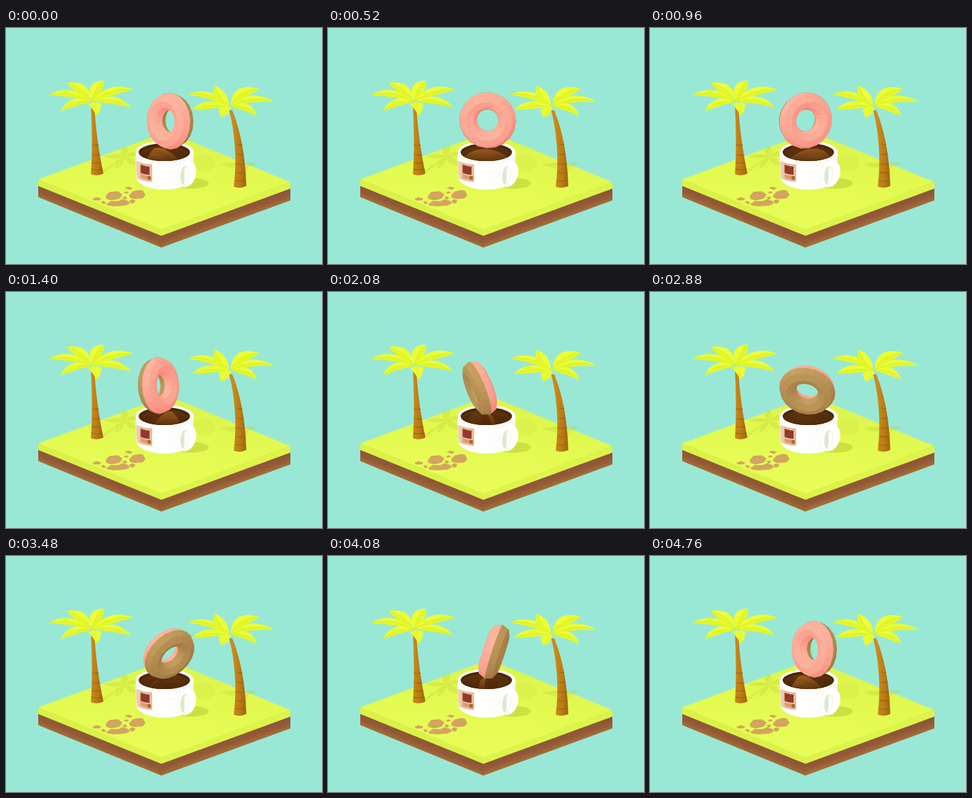
An HTML page with a canvas that plays this animation: 480 px wide and 360 px high, repeating every 4.8 s.

```html
<!DOCTYPE html>
<html>
<head>
<meta charset="utf-8">
<title>Donut and coffee island</title>
<style>
html, body { margin: 0; width: 100%; height: 100%; overflow: hidden; background: #99e8d6; }
canvas { display: block; }
</style>
</head>
<body>
<canvas id="stage" width="480" height="360"></canvas>
<script>
const ctx = document.getElementById('stage').getContext('2d');
const LOOP = 4800, TAU = Math.PI * 2, RAD = Math.PI / 180;

function gradient(x0, y0, x1, y1, ...colors) {
  const g = ctx.createLinearGradient(x0, y0, x1, y1);
  colors.forEach((c, i) => g.addColorStop(i / (colors.length - 1), c));
  return g;
}
function shape(path, color) {
  ctx.fillStyle = color;
  ctx.fill(new Path2D(path));
}
function line(path, color, width) {
  ctx.strokeStyle = color;
  ctx.lineWidth = width;
  ctx.stroke(new Path2D(path));
}
function ellipse(x, y, rx, ry, color) {
  ctx.beginPath();
  ctx.ellipse(x, y, rx, ry, 0, 0, TAU);
  ctx.fillStyle = color;
  ctx.fill();
}

function ground() {
  shape('M49 231L236 306V335L49 258Z', gradient(49, 240, 42.6, 255.4, '#8e5539', '#935a36', '#a66f38'));
  shape('M432 235L236 306V335L432 263Z', gradient(432, 245, 437.8, 261, '#8e5539', '#935a36', '#a66f38'));
  shape('M49 231L236 306V317L49 241Z', '#daf247');
  shape('M432 235L236 306V317L432 245Z', '#dcf44a');
  shape('M49 231L245 158L432 235L236 307Z', gradient(240, 158, 225, 306, '#dcf44e', '#e3fa50', '#e9fd5a'));
  const shade = 'rgba(178,200,48,.25)';
  ellipse(300, 206, 17, 13, 'rgba(178,200,48,.12)');
  ellipse(281, 237, 27, 8, 'rgba(178,190,48,.45)');
  shape('M140 222L176 197Q158 202 149 195Q164 191 177 194Q170 184 182 180Q188 186 182 194Q196 184 208 190Q196 197 184 196Q199 201 197 210Q183 208 180 198Q178 211 166 214Q165 204 177 198L148 222Z', shade);
  shape('M352 241L364 211Q345 217 325 208Q344 203 364 208Q372 201 382 206Q376 211 367 212L360 242Z', shade);
}

function stones() {
  shape(`M131 261L137 258L145 260L142 263L134 263Z
    M144 265L149 264L152 267L148 269Z
    M151 257L157 250L170 249L177 254L173 260L161 263L153 261Z
    M152 269L159 264L171 264L177 261L186 264L188 268L181 271L165 272L155 271Z
    M180 244L186 242L193 244L188 247Z
    M179 251L183 249L187 251L182 253Z
    M187 255L193 249L203 247L208 248L212 255L207 260L195 261L188 259Z
    M177 258L182 257L184 260L180 262Z
    M187 264L192 261L197 264L193 268L189 267Z`, '#d3a560');
}

// Curved leaf from the crown to its tip, with a slightly darker lower half and rib.
function leaf(x, y, cx, cy, tx, ty, w) {
  const len = Math.hypot(tx - x, ty - y);
  let nx = -(ty - y) / len * w, ny = (tx - x) / len * w;
  if (ny < 0) { nx = -nx; ny = -ny; }
  const start = `M${x} ${y}Q`, back = `${tx} ${ty}Q`;
  const up = `${cx - nx} ${cy - ny} `, low = `${cx + nx} ${cy + ny} `;
  shape(`${start}${up}${back}${low}${x} ${y}`, '#ecfe35');
  shape(`${start}${cx} ${cy} ${back}${low}${x} ${y}`, '#e2f62a');
  line(`${start}${cx} ${cy} ${tx} ${ty}`, '#cfe42a', .6);
}

const BARK = ['#c98b1e', '#bd7c14', '#a0640f'];

function leftPalm() {
  shape('M129 119L134 119Q138 177 148 222Q138 227 129 223Q132 178 129 119Z', gradient(128, 0, 148, 0, ...BARK));
  line('M131 178Q136 181 141 178M131 193Q137 196 143 193M130 205Q138 208 145 205M130 215Q138 218 147 215', '#8f5d14', .9);
  leaf(130, 113, 96, 92, 64, 103, 10);
  leaf(129, 111, 119, 90, 91, 84, 15);
  leaf(131, 112, 134, 90, 149, 80, 18);
  leaf(133, 111, 157, 91, 194, 94, 12);
  leaf(133, 112, 164, 104, 190, 121, 11);
  leaf(129, 113, 101, 108, 83, 127, 11);
  shape('M125 116L133 113L145 115L143 126L138 134L133 126Z', '#eafc32');
  line('M134 114L138 133', '#cfe42a', .6);
}

function rightPalm() {
  shape('M339 125L344 126Q363 174 365 241Q355 246 346 242Q353 182 339 125Z', gradient(345, 0, 365, 0, ...BARK));
  line('M351 177Q355 180 359 177M351 192Q356 195 361 192M350 207Q356 210 363 207M349 220Q356 223 363 220M348 232Q356 236 364 232', '#8f5d14', .9);
  leaf(339, 120, 308, 95, 277, 102, 10);
  leaf(339, 119, 323, 106, 317, 88, 18);
  leaf(341, 118, 352, 95, 385, 93, 16);
  leaf(342, 119, 372, 101, 409, 113, 10);
  leaf(342, 120, 366, 115, 382, 134, 11);
  leaf(338, 120, 306, 113, 282, 125, 11);
  shape('M323 123L337 119L341 122L337 131L328 137L324 130Z', '#eafc32');
  line('M338 121L329 136', '#cfe42a', .6);
}

function mugBody() {
  shape('M197 190L198 229C201 240 220 246.5 240 246.5C261 246.5 279 241 284 229L285 190Z', gradient(197, 0, 285, 0, '#f8faf6', '#ffffff', '#fdfdfc', '#f4f6ef'));
  shape('M198 203Q210 208 222 208V235Q208 234 199 229Z', '#e8bc94');
  shape('M198 203L203 205V231L199 229Z', '#efcbaf');
  shape('M204.5 208.5Q211 211 218 211.5V224Q211 224 204.5 221Z', '#93382e');
  shape('M205 223Q210 226 215 226V231Q209 230 205 228Z', '#d99a70');
  shape('M215 226L220 226V232L215 231Z', '#b4622b');
  // Handle
  shape('M263 220C264 208 270 203 276 202C286 203 290 211 289 220C288 234 279 243 270 243C264 241 262 234 263 220Z', '#ffffff');
  shape('M265 230C264 218 268 211 273 210C269 222 273 230 270 239C266 239 265 235 265 230Z', '#dfe7cd');
  line('M273 210C280 216 280 231 269 242', '#f1f4e6', 1.2);
}

// Ring leaning on its lowest point while it turns about the vertical axis.
const RING = 30, TUBE = 13, THICK = 14.5, SEGMENTS = 20, SIDES = 8;
const LEAN = 15 * RAD, VIEW = 24 * RAD, START = -47 * RAD;
const LIGHT = [-.35, .85, .4];
// Each material runs from its shaded to its lit colour.
const GLAZE = [[247, 116, 108], [252, 182, 160]];
const DOUGH = [[146, 108, 56], [198, 160, 96]];
const GLAZE_MIRROR = [[140, 82, 24], [186, 120, 48]];
const DOUGH_MIRROR = [[88, 48, 14], [122, 74, 26]];

function donutFaces(turn, mirrored) {
  const sl = Math.sin(LEAN), cl = Math.cos(LEAN), st = Math.sin(turn), ct = Math.cos(turn);
  const right = [ct, 0, -st], up = [-sl * st, cl, -sl * ct], normal = [cl * st, sl, cl * ct];
  const mix = (a, b, c) => right.map((r, i) => r * a + up[i] * b + normal[i] * c);
  const point = (u, v) => {
    const r = RING + TUBE * Math.cos(v);
    const p = mix(r * Math.cos(u), r * Math.sin(u) + RING + TUBE, THICK * Math.sin(v));
    if (mirrored) p[1] = -2 - p[1];
    return {
      x: 241 + p[0],
      y: 183 - p[1] * Math.cos(VIEW) + p[2] * Math.sin(VIEW),
      depth: p[2] * Math.cos(VIEW) + p[1] * Math.sin(VIEW)
    };
  };
  const glaze = mirrored ? GLAZE_MIRROR : GLAZE, dough = mirrored ? DOUGH_MIRROR : DOUGH;
  const du = TAU / SEGMENTS, dv = TAU / SIDES, faces = [];
  for (let i = 0; i < SEGMENTS; i++) for (let j = 0; j < SIDES; j++) {
    const u = i * du, v = j * dv, mu = u + du / 2, mv = v + dv / 2;
    const n = mix(Math.cos(mv) * Math.cos(mu), Math.cos(mv) * Math.sin(mu), Math.sin(mv));
    const lit = .5 + .5 * (n[0] * LIGHT[0] + n[1] * LIGHT[1] + n[2] * LIGHT[2]);
    const [dark, bright] = Math.sin(mv) > 0 ? glaze : dough;
    const points = [point(u, v), point(u + du, v), point(u + du, v + dv), point(u, v + dv)];
    faces.push({
      points,
      depth: points.reduce((sum, p) => sum + p.depth, 0),
      color: `rgb(${dark.map((c, k) => Math.round(c + (bright[k] - c) * lit))})`
    });
  }
  return faces.sort((a, b) => a.depth - b.depth);
}

function donut(turn, mirrored) {
  ctx.lineWidth = .6;
  ctx.lineJoin = 'round';
  for (const { points, color } of donutFaces(turn, mirrored)) {
    ctx.beginPath();
    points.forEach(p => ctx.lineTo(p.x, p.y));
    ctx.closePath();
    ctx.fillStyle = ctx.strokeStyle = color;
    ctx.fill();
    ctx.stroke();
  }
}

function coffee(turn) {
  ellipse(241, 189, 44, 16.5, '#ffffff');
  ctx.save();
  ctx.beginPath();
  ctx.ellipse(240.5, 189.5, 39, 13.5, 0, 0, TAU);
  ctx.clip();
  ctx.fillStyle = '#4a2609';
  ctx.fillRect(200, 174, 82, 32);
  ellipse(240.5, 192.5, 38, 12.5, gradient(0, 180, 0, 204, '#5c330f', '#532c0a'));
  donut(turn, true);
  ctx.fillStyle = gradient(0, 184, 0, 204, 'rgba(74,36,6,0)', 'rgba(74,36,6,.85)');
  ctx.fillRect(200, 174, 82, 32);
  ctx.restore();
}

function draw() {
  const turn = (performance.now() % LOOP) / LOOP * TAU + START;
  ctx.fillStyle = '#99e8d6';
  ctx.fillRect(0, 0, 480, 360);
  ground();
  stones();
  leftPalm();
  mugBody();
  coffee(turn);
  donut(turn, false);
  rightPalm();
  requestAnimationFrame(draw);
}
draw();
</script>
</body>
</html>
```
